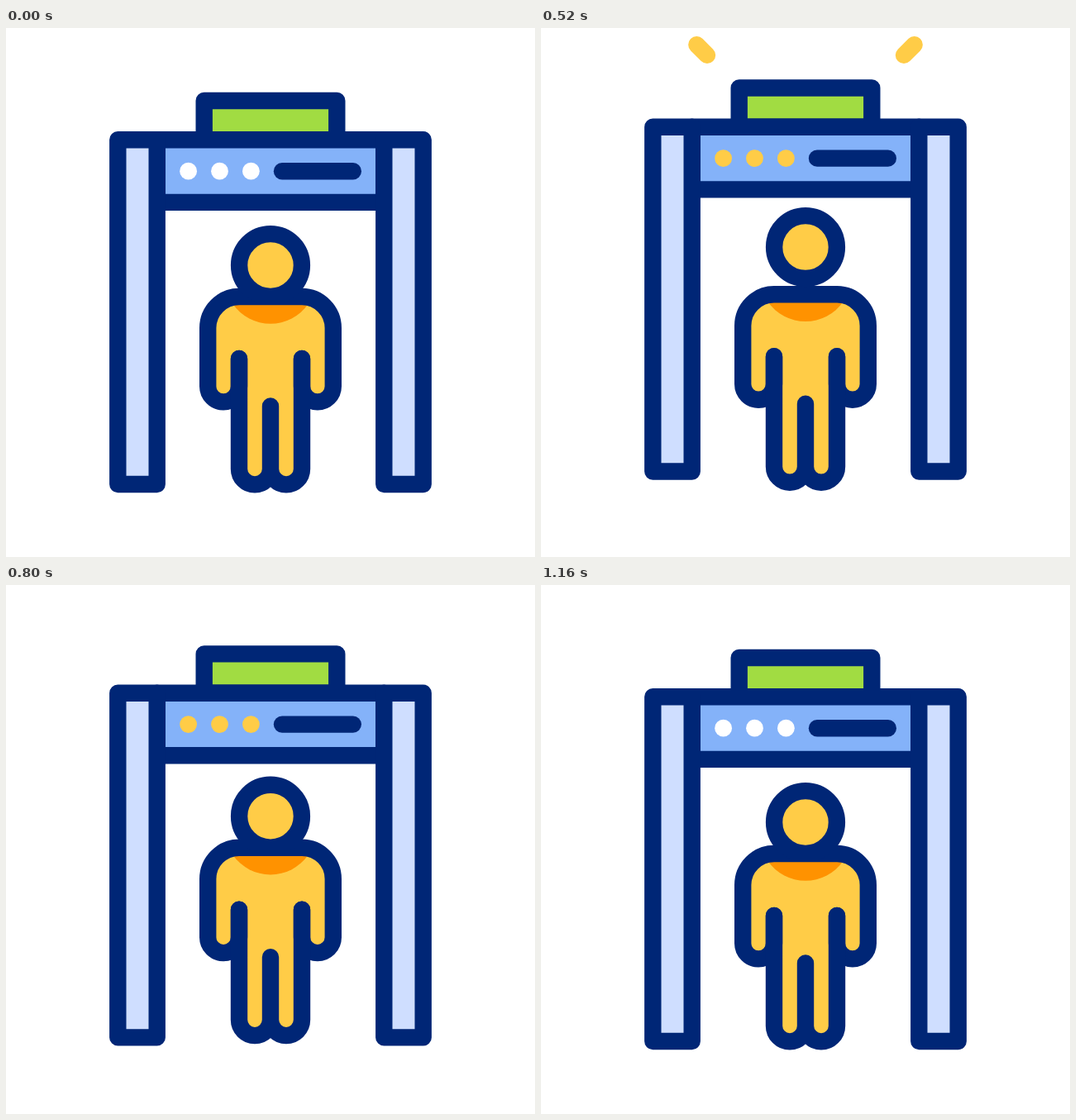
These frames come from a looping animation (640x640 px, 1.24 s). An HTML page:

```html
<!DOCTYPE html>
<html lang="en">
<head>
<meta charset="utf-8">
<title>Security gate</title>
<style>
  html, body { margin: 0; width: 100%; height: 100%; overflow: hidden; background: #fff; }
  svg { display: block; width: 100%; height: 100%; }
  .line { stroke: #002676; }
  .ray { stroke: #ffcc47; }
</style>
</head>
<body>
<svg viewBox="0 0 640 640" fill="none" stroke-width="20.4" stroke-linecap="round" stroke-linejoin="round">
  <g id="gate">
    <path class="ray"/>
    <path class="ray" transform="matrix(-1 0 0 1 640 0)"/>
    <g class="line">
      <rect x="239.7" y="88" width="160.6" height="47.3" fill="#a1dc42"/>
      <rect x="182.7" y="135.3" width="274.6" height="75.6" fill="#84b2f9"/>
      <rect x="135.3" y="135.3" width="47.4" height="416.7" fill="#cfdeff"/>
      <rect x="457.3" y="135.3" width="47.4" height="416.7" fill="#cfdeff"/>
      <path d="M334 173.2H419.8"/>
    </g>
    <g id="lamps">
      <circle cx="220.6" cy="173.2" r="10.4"/>
      <circle cx="258.5" cy="173.2" r="10.4"/>
      <circle cx="296.4" cy="173.2" r="10.4"/>
    </g>
  </g>
  <g id="body">
    <path fill="#ffcc47" d="M282 325H358A38 38 0 0 1 395.8 363V433.5a18.9 18.9 0 0 1-37.8 0V533.4a19 19 0 0 1-38 0a19 19 0 0 1-38 0V433.5a18.9 18.9 0 0 1-37.8 0V363A38 38 0 0 1 282 325Z"/>
    <path fill="#ff9200" d="M274.5 334A55.5 55.5 0 0 0 365.5 334Z"/>
    <path class="line" d="M282 400V433.5a18.9 18.9 0 0 1-37.8 0V363A38 38 0 0 1 282 325H358A38 38 0 0 1 395.8 363V433.5a18.9 18.9 0 0 1-37.8 0V400"/>
    <path class="line" d="M282 400V533.4a19 19 0 0 0 38 0V457.5V533.4a19 19 0 0 0 38 0V400"/>
    <circle id="head" class="line" cx="320" cy="287" r="37.9" fill="#ffcc47"/>
  </g>
</svg>
<script>
  const LOOP = 1240, STEP = 40;
  const byId = id => document.getElementById(id);
  const gate = byId("gate"), lamps = byId("lamps"), body = byId("body"), head = byId("head");
  const rays = document.querySelectorAll(".ray");

  const ease = (t, from, to) => {
    const u = Math.min(1, Math.max(0, (t - from) / (to - from)));
    return u * u * (3 - 2 * u);
  };
  // Rises by height from start to peak, settles back at end.
  const hop = (t, start, peak, end, height) =>
    -height * (ease(t, start, peak) - ease(t, peak, end));
  const lift = (node, y) => node.setAttribute("transform", `translate(0 ${y.toFixed(2)})`);
  const mix = (a, b, u) => Math.round(a + (b - a) * u);
  const rayPoint = u => `${220.6 - 32.6 * u} ${68 - 32.5 * u}`;

  function draw(t) {
    lift(gate, hop(t, 86, 440, 680, 21) + hop(t, 680, 920, 1160, 9.2));
    lift(body, hop(t, 95, 375, 600, 9.3) + hop(t, 600, 740, 940, 9.3));
    lift(head, hop(t, 200, 440, 680, 26));

    const lit = ease(t, 80, 200) - ease(t, 1000, 1150);
    lamps.setAttribute("fill", `rgb(255,${mix(255, 204, lit)},${mix(255, 71, lit)})`);

    const front = ease(t, 115, 546), back = ease(t, 275, 706);
    const shown = front > back;
    for (const ray of rays) {
      ray.setAttribute("d", shown ? `M${rayPoint(back)}L${rayPoint(front)}` : "");
    }
  }

  const began = performance.now();
  function tick() {
    const t = (performance.now() - began) % LOOP;
    draw(Math.floor(t / STEP) * STEP);
    requestAnimationFrame(tick);
  }
  tick();
</script>
</body>
</html>
```
